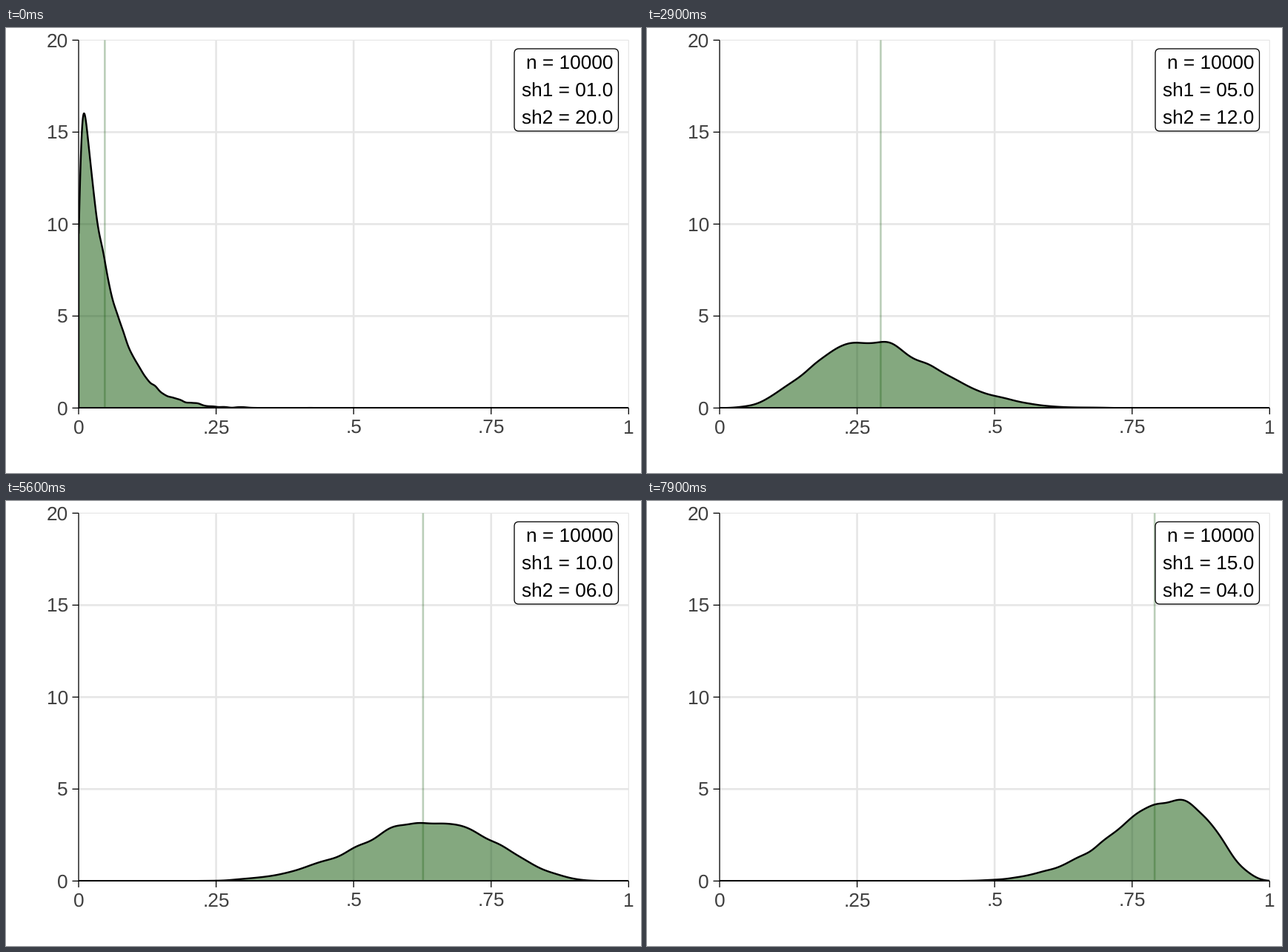
Write a matplotlib script that moves like this. It is 857x600 px and loops after 8 s.

```python
import matplotlib.pyplot as plt
import numpy as np
from matplotlib.animation import FuncAnimation
from matplotlib.patches import FancyBboxPatch, Polygon, Rectangle

plt.rcParams["text.hinting"] = "no_hinting"

W, H, DPI = 857, 600, 64
LEFT, RIGHT, TOP, BASE = 98, 840.3, 16.4, 512.4
DRAWS, BINS, FRAMES = 10000, 2000, 80
GREEN = (0.04, 0.32, 0.004)
GRID, LABEL = "#e6e6e6", "#404040"

# Each first shape is paired with a falling second shape.
SHAPES = [(a, b) for a in (1, 5, 10, 15) for b in [*range(20, 0, -1), 0.5]]

x = (np.arange(BINS) + 0.5) / BINS


def pt(px):
    return px * 72 / DPI


def to_px(u, v):
    return LEFT + (RIGHT - LEFT) * u, BASE - (BASE - TOP) * v / 20


def density(a, b, seed):
    """Gaussian density estimate of a beta sample, and the sample mean."""
    sample = np.random.default_rng(seed).beta(a, b, DRAWS)
    q1, q3 = np.percentile(sample, (25, 75))
    h = 0.9 * min(sample.std(), (q3 - q1) / 1.349) * DRAWS ** -0.2
    mass = np.histogram(sample, BINS, (0, 1))[0] / DRAWS
    m = int(4 * h * BINS) + 1
    kernel = np.exp(-0.5 * (np.arange(-m, m + 1) / (h * BINS)) ** 2)
    return np.convolve(mass, kernel / kernel.sum())[m:-m] * BINS, sample.mean()


fig = plt.figure(figsize=(W / DPI, H / DPI), dpi=DPI, facecolor="white")
ax = fig.add_axes([0, 0, 1, 1])
ax.set_xlim(0, W)
ax.set_ylim(H, 0)
ax.axis("off")


def line(xs, ys, color, width, z):
    return ax.plot(xs, ys, color=color, lw=pt(width), zorder=z,
                   solid_capstyle="butt", snap=False)[0]


def text(tx, ty, s, ha, color="black"):
    return ax.text(tx, ty, s, ha=ha, va="baseline", color=color, zorder=8,
                   family="Liberation Sans", size=pt(26.3))


for i, name in enumerate(["0", ".25", ".5", ".75", "1"]):
    gx, gy = to_px(i / 4, i * 5)
    if i:
        width = 1.2 if i == 4 else 2.6
        line([gx, gx], [TOP, BASE], GRID, width, 1)
        line([LEFT, RIGHT], [gy, gy], GRID, width, 1)
    line([gx, gx], [BASE, BASE + 8.5], "black", 1.3, 6)
    line([LEFT - 8.5, LEFT], [gy, gy], "black", 1.3, 6)
    text(gx, 547, name, "center", LABEL)
    text(83.7, gy + 9.4, str(i * 5), "right", LABEL)
line([LEFT, LEFT], [TOP, BASE], "black", 1.3, 6)
line([LEFT, RIGHT], [BASE, BASE], "black", 1.3, 6)

ax.add_patch(FancyBboxPatch((686, 28), 140.5, 111, boxstyle="round,pad=0,rounding_size=6",
                            fc="white", ec="black", lw=pt(1.3), zorder=7))
text(819, 55, f"n = {DRAWS}", "right")
sh1 = text(819, 92.5, "", "right")
sh2 = text(819, 130, "", "right")

blank = np.zeros((3, 2))
fill = ax.add_patch(Polygon(blank, fc=GREEN, alpha=0.5, lw=0, zorder=2))
mean_line = line([], [], GREEN, 2.6, 3)
mean_line.set_alpha(0.28)
outline = ax.add_patch(Polygon(blank, fill=False, ec="black", lw=pt(2.4),
                               joinstyle="round", snap=False, zorder=5))
outline.set_clip_path(Rectangle((LEFT, TOP), RIGHT - LEFT, BASE - TOP,
                                transform=ax.transData))


def draw(k):
    a, b = SHAPES[k]
    f, mean = density(a, b, 100 + k)
    verts = np.column_stack(to_px(np.r_[0, 0, x, 1, 1], np.r_[0, f[0], f, f[-1], 0]))
    fill.set_xy(verts)
    outline.set_xy(verts)
    mx = to_px(mean, 0)[0]
    mean_line.set_data([mx, mx], [TOP, BASE])
    sh1.set_text(f"sh1 = {a:04.1f}")
    sh2.set_text(f"sh2 = {b:04.1f}")
    return fill, outline, mean_line, sh1, sh2


anim = FuncAnimation(fig, draw, frames=FRAMES, interval=100, repeat=True, repeat_delay=0)
plt.show()
```
